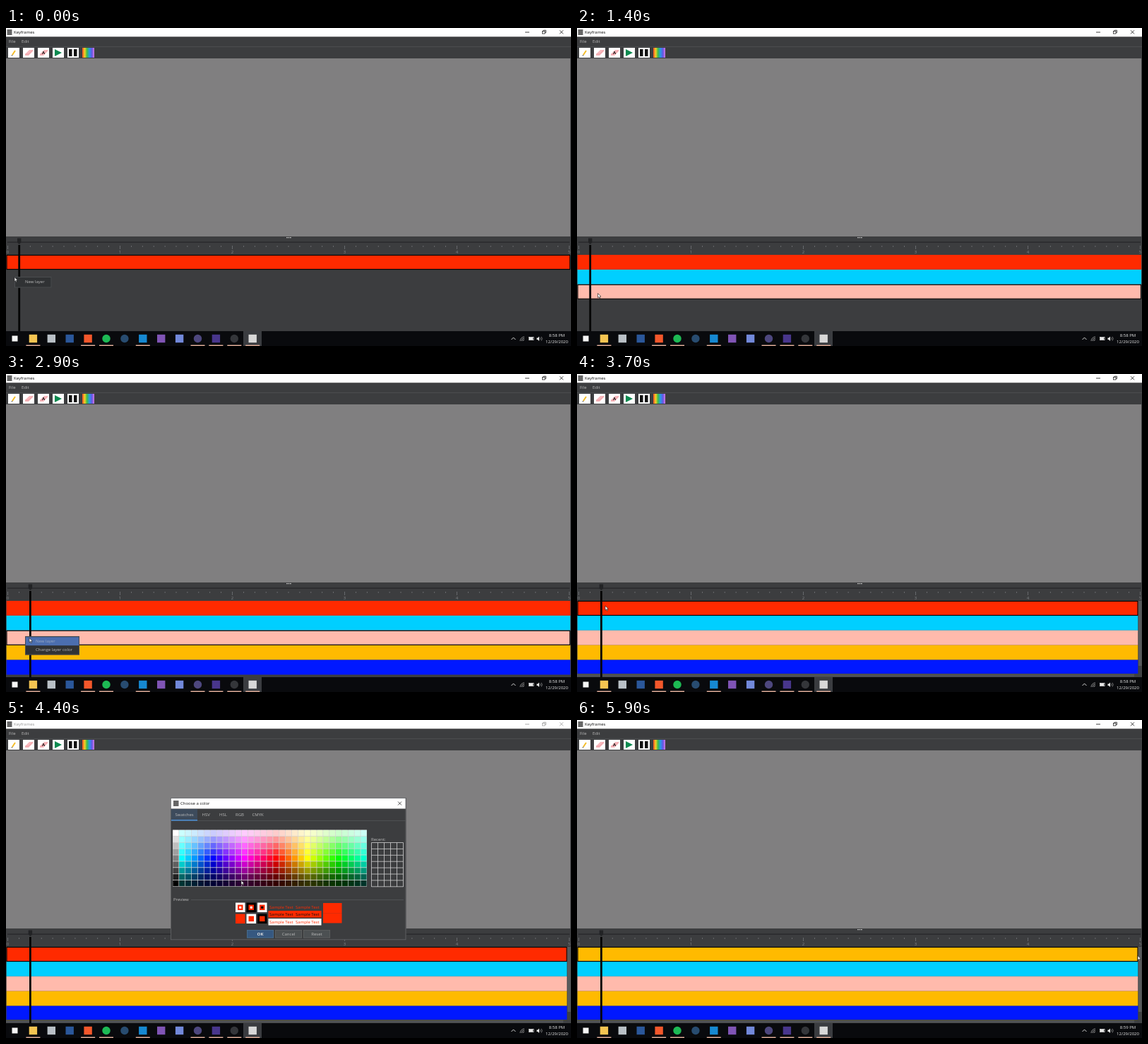
An HTML page with a canvas that plays this animation: 800 by 450 pixels, repeating every 6.1 s.

```html
<!DOCTYPE html>
<html lang="en">
<head>
<meta charset="utf-8">
<title>Keyframes</title>
<style>
  html, body { margin: 0; height: 100%; overflow: hidden; background: #3c3d3f; }
  canvas { display: block; }
</style>
</head>
<body>
<canvas id="stage" width="800" height="450"></canvas>
<script>
const ctx = document.getElementById('stage').getContext('2d');
const LOOP = 6100, STEP = 100;
const RED = '#ff2a00', AMBER = '#ffba00', PANEL = '#3c3d3f', TEXT = '#bbbbbb';
const LAYERS = [
  { at: 0, color: RED }, { at: 500, color: '#00cfff' }, { at: 1100, color: '#ffbaac' },
  { at: 2000, color: AMBER }, { at: 2500, color: '#0018ff' }
];
const SCROLLBARS_AT = 3000, RECOLOR_AT = 5200;
const DIALOG = { open: 4200, pick: 4700, close: RECOLOR_AT };
const MENUS = [
  { from: 0, to: 500, x: 12, y: 352, items: ['New layer'] },
  { from: 700, to: 1100, x: 20, y: 372, items: ['New layer'] },
  { from: 1700, to: 2000, x: 27, y: 371, items: ['New layer', 'Change layer color'] },
  { from: 2200, to: 2500, x: 27, y: 371, items: ['New layer', 'Change layer color'] },
  { from: 2700, to: 3000, x: 27, y: 371, items: ['New layer', 'Change layer color'] },
  { from: 3900, to: 4200, x: 40, y: 328, items: ['New layer', 'Change layer color'] }
];
// time, x, y
const POINTER = [
  [0, 12, 352.5], [300, 25, 359], [500, 25, 359], [700, 20, 372], [1000, 32, 379],
  [1400, 29.5, 375.5], [1700, 27, 371], [1900, 33, 375], [2200, 27, 371], [2400, 33, 375],
  [2700, 27, 371], [2900, 33, 373.5], [3100, 33, 374], [3500, 40, 328], [3900, 40, 328],
  [4100, 54, 345], [4400, 333, 227], [4600, 417, 195], [4700, 417, 195], [4900, 360, 302],
  [5000, 355.5, 304.5], [5200, 355.5, 304.5], [5600, 620, 334], [5900, 794, 333.5]
];

function rect(x, y, w, h, fill) {
  ctx.fillStyle = fill;
  ctx.fillRect(x, y, w, h);
}
function frame(x, y, w, h, color, width = 1) {
  ctx.strokeStyle = color;
  ctx.lineWidth = width;
  ctx.strokeRect(x, y, w, h);
}
function line(color, width, ...p) {
  ctx.strokeStyle = color;
  ctx.lineWidth = width;
  ctx.beginPath();
  for (let i = 0; i < p.length; i += 2) ctx.lineTo(p[i], p[i + 1]);
  ctx.stroke();
}
function poly(fill, ...p) {
  ctx.fillStyle = fill;
  ctx.beginPath();
  for (let i = 0; i < p.length; i += 2) ctx.lineTo(p[i], p[i + 1]);
  ctx.closePath();
  ctx.fill();
}
function disc(x, y, r, fill) {
  ctx.fillStyle = fill;
  ctx.beginPath();
  ctx.arc(x, y, r, 0, 7);
  ctx.fill();
}
function text(s, x, y, color = TEXT, align = 'left', weight = '') {
  ctx.font = `${weight} 6px "Open Sans", sans-serif`;
  ctx.textAlign = align;
  ctx.textBaseline = 'middle';
  ctx.fillStyle = color;
  ctx.fillText(s, x, y);
}

function pointerAt(t) {
  const i = POINTER.findIndex(p => p[0] > t);
  if (i < 0) return POINTER.at(-1).slice(1);
  const [t0, x0, y0] = POINTER[i - 1], [t1, x1, y1] = POINTER[i];
  const k = (t - t0) / (t1 - t0);
  return [x0 + (x1 - x0) * k, y0 + (y1 - y0) * k];
}

function drawWindow(inactive) {
  const ink = inactive ? '#999' : '#111';
  rect(0, 0, 800, 12.5, '#fff');
  rect(1.5, 2, 7, 8, '#666');
  text('Keyframes', 11, 6.5, ink);
  line(ink, .8, 735, 6, 741, 6);
  frame(759.5, 4.5, 3.5, 3.5, ink, .7);
  line(ink, .7, 761, 4.5, 761, 3.2, 764.5, 3.2, 764.5, 6.7, 763, 6.7);
  line(ink, .8, 784, 3.3, 789, 8.3);
  line(ink, .8, 789, 3.3, 784, 8.3);
  rect(0, 12.5, 800, 30.5, PANEL);
  rect(0, 26, 800, 1, '#4b4d4f');
  text('File', 4, 19.5);
  text('Edit', 22, 19.5);
  drawTools();
  rect(0, 43, 799, 252, '#807f80');
}

function drawTools() {
  for (let i = 0; i < 5; i++) rect(3 + 21 * i, 28, 16, 14, '#fff');
  line('#f5bd28', 2, 9, 38, 13, 32);
  line('#333', 1, 8, 39.5, 9, 38);
  for (const x of [26, 47]) {
    poly('#f7b9bd', x + 1, 37, x + 7, 31, x + 12, 31, x + 12, 33, x + 6, 39, x + 1, 39);
    line('#e58e98', .6, x + 1, 37, x + 6, 37, x + 12, 31);
  }
  text('A', 53, 35.5, '#111', 'center', 'bold');
  poly('#0d8a50', 69, 30, 79, 35, 69, 40);
  rect(89, 30, 4.5, 10, '#111');
  rect(96, 30, 4.5, 10, '#111');
  const rainbow = ctx.createLinearGradient(108, 0, 125, 0);
  ['#f04a28', '#f5cf25', '#38bd4c', '#2b98e8', '#6558e5', '#d579e4']
    .forEach((c, i) => rainbow.addColorStop(i / 5, c));
  rect(108, 28, 17, 14, rainbow);
}

function drawTimeline(t) {
  const scroll = t >= SCROLLBARS_AT;
  const head = t < 1500 ? 18.7 : 34.4;
  const selected = t < 1400 ? 0 : t < 3600 ? 2 : 0;
  rect(0, 295, 800, 134, PANEL);
  for (let i = 0; i < 3; i++) rect(397 + 2.5 * i, 296, 1.8, 1.2, '#c8c8c8');
  rect(2, 302.5, 796, 1.2, '#252628');
  for (let i = 0; i <= 50; i++) {
    const x = 2.5 + i * 15.9;
    rect(x - .4, 308, .8, i % 10 ? 2 : 5, '#737578');
    if (i % 10 === 0) text(i / 10, x, 317, '#858789', 'center');
  }
  const right = scroll ? 794.5 : 799, bottom = scroll ? 424 : 426;
  LAYERS.forEach(({ at, color }, i) => {
    if (t < at) return;
    const y = 321 + i * 20.9;
    const fill = i === 0 && t >= RECOLOR_AT ? AMBER : color;
    rect(.7, y, right - .7, Math.min(20.9, bottom - y), fill);
  });
  frame(1, 321.5 + selected * 20.9, right - 1.5, 20, '#050505', 1.2);
  if (scroll) {
    rect(794.5, 321, 5.5, 108, '#3f4143');
    rect(795, 321, 4.5, 92, '#585a5c');
    rect(0, 424, 794.5, 5, '#3f4143');
    rect(0, 424.5, 789, 4, '#505254');
  }
  poly('#222325', head - 2.7, 297.5, head + 2.7, 297.5, head + 2.7, 303.5, head, 306, head - 2.7, 303.5);
  rect(head - 1.4, 307, 2.8, 122, '#050505');
}

function drawMenu({ x, y, items }, px, py) {
  const w = items.length > 1 ? 77 : 52.5, h = 2.5 + items.length * 12 + (items.length > 1 ? 0 : 1);
  rect(x, y, w, h, '#303234');
  frame(x + .5, y + .5, w - 1, h - 1, '#515456', .8);
  items.forEach((label, i) => {
    const top = y + 1.2 + i * 12;
    const hover = px > x + 1 && px < x + w && py > top && py < top + 12;
    if (hover) rect(x + 1, top, w - 2, 12, '#4b6eaf');
    text(label, x + 15, top + 6.6, hover ? '#9aa9c2' : TEXT);
  });
}

function drawSwatches(picked) {
  const cw = 8.87, ch = 8.9;
  rect(236, 155.5, 31 * cw, 9 * ch, '#d5d5d5');
  for (let c = 0; c < 31; c++) {
    for (let r = 0; r < 9; r++) {
      const fill = c ? `hsl(${168 + 12 * c} 100% ${90 - 10 * r}%)` : `hsl(0 0% ${100 - 12.5 * r}%)`;
      rect(236.3 + c * cw, 155.8 + r * ch, cw - .7, ch - .8, fill);
    }
  }
  if (picked) {
    frame(413.6, 191.5, 7.8, 7.8, '#4d4100', .9);
    line('#4d4100', .8, 413.6, 199.3, 421.4, 191.5);
  }
  text('Recent:', 517, 169);
  if (picked) rect(518, 174, 8, 8, AMBER);
  for (let c = 0; c <= 5; c++) line('#d0d0d0', .8, 517.5 + c * 9, 173.5, 517.5 + c * 9, 236);
  for (let r = 0; r <= 7; r++) line('#d0d0d0', .8, 517.5, 173.5 + r * 8.9, 562.5, 173.5 + r * 8.9);
}

function drawPreview(color) {
  text('Preview', 237, 254);
  rect(262, 254, 301, .8, '#55585a');
  const nested = (x, y, ...fills) => fills.forEach((f, i) => {
    const inset = [0, 3, 5.2][i];
    rect(x + inset, y + inset, 13.5 - 2 * inset, 13.5 - 2 * inset, f);
  });
  nested(325, 258.5, '#fff', color, '#fff');
  nested(340.5, 258.5, '#000', color, '#fff');
  nested(356, 258.5, '#fff', color, '#000');
  nested(325, 274.5, color);
  nested(340.5, 274.5, '#fff', color);
  nested(356, 274.5, '#000', color);
  rect(371.5, 270, 75, 9.5, color);
  rect(371.5, 281, 75, 9.5, '#fff');
  [color, '#111', color].forEach((ink, i) => {
    for (const x of [373, 410]) text('Sample Text', x, 265 + i * 10.8, ink);
  });
  rect(449, 259, 26.5, 14.2, RED);
  rect(449, 273.2, 26.5, 14.2, color);
}

function drawDialog(t) {
  const picked = t >= DIALOG.pick;
  rect(233, 110, 333.5, 201, PANEL);
  rect(233, 110.5, 333, 15, '#fff');
  frame(233.4, 110.4, 332.6, 200.4, '#64676a', .8);
  rect(237, 114, 7.5, 8, '#666');
  text('Choose a color', 247, 118.5, '#111');
  line('#222', .8, 555, 115.5, 560, 120.5);
  line('#222', .8, 560, 115.5, 555, 120.5);
  if (!picked) rect(234, 126, 37, 16, '#3d4b5c');
  rect(234, 142, 332, .7, '#55585a');
  rect(234, 141, 37, 1.7, '#4a88c7');
  [['Swatches', 239.5], ['HSV', 277.5], ['HSL', 302], ['RGB', 325], ['CMYK', 348.5]]
    .forEach(([s, x]) => text(s, x, 134.3));
  drawSwatches(picked);
  drawPreview(picked ? AMBER : RED);
  ['OK', 'Cancel', 'Reset'].forEach((label, i) => {
    const x = 341 + 40 * i;
    rect(x, 297, 38, 11.5, i ? '#4c5052' : '#365880');
    frame(x + .4, 297.4, 37.2, 10.7, i ? '#5e6060' : '#4c708c', .8);
    text(label, x + 19, 303, i ? TEXT : '#e0e0e0', 'center', i ? '' : 'bold');
  });
}

function drawTaskbar(t) {
  rect(0, 429, 800, 21, '#090a0d');
  rect(336, 429, 26, 21, '#3a3c40');
  const colors = ['#f5f5f5', '#f4c451', '#b9c0c6', '#2b579a', '#f4572b', '#1db954', '#284c70',
    '#1688d1', '#8054b5', '#7289da', '#4d477e', '#48368c', '#34363a', '#d8d8d8'];
  const round = [5, 6, 10, 12], running = [1, 4, 5, 7, 10, 11, 12, 13];
  colors.forEach((c, i) => {
    const x = 12.5 + i * 25.9;
    const r = i ? 5.7 : 4;
    if (round.includes(i)) disc(x, 439.5, r, c);
    else rect(x - r, 439.5 - r, 2 * r, 2 * r, c);
    if (running.includes(i)) rect(x - 10, 448.5, 20, 1.5, '#dba995');
  });
  const ink = '#e8e8e8';
  line(ink, .9, 715.5, 441, 718.5, 438, 721.5, 441);
  for (const r of [2, 4, 6]) {
    ctx.beginPath();
    ctx.arc(734, 443, r, Math.PI, Math.PI * 1.5);
    ctx.strokeStyle = '#aaa';
    ctx.lineWidth = .8;
    ctx.stroke();
  }
  frame(740.5, 437.5, 6.5, 4, ink, .8);
  rect(741, 438, 5, 3, ink);
  poly(ink, 751.5, 438.5, 753, 438.5, 755, 436.5, 755, 443, 753, 441, 751.5, 441);
  for (const r of [2, 4]) {
    ctx.beginPath();
    ctx.arc(755, 439.7, r, -.8, .8);
    ctx.strokeStyle = '#aaa';
    ctx.lineWidth = .7;
    ctx.stroke();
  }
  text(t < 4700 ? '8:58 PM' : '8:59 PM', 780, 435, ink, 'center');
  text('12/29/2020', 780, 444.5, ink, 'center');
}

function drawPointer(x, y) {
  const p = [0, 0, 0, 6.2, 1.4, 5, 2.4, 7.2, 3.4, 6.8, 2.5, 4.6, 4.4, 4.5]
    .map((v, i) => v + (i % 2 ? y : x));
  poly('#fff', ...p);
  line('#111', .6, ...p, x, y);
}

function draw(t) {
  const dialog = t >= DIALOG.open && t < DIALOG.close;
  const [px, py] = pointerAt(t);
  drawWindow(dialog);
  drawTimeline(t);
  MENUS.filter(m => t >= m.from && t < m.to).forEach(m => drawMenu(m, px, py));
  if (dialog) drawDialog(t);
  drawTaskbar(t);
  drawPointer(px, py);
}

const start = performance.now();
function tick() {
  const t = (performance.now() - start) % LOOP;
  draw(Math.min(Math.floor(t / STEP) * STEP, 5900));
  requestAnimationFrame(tick);
}
tick();
</script>
</body>
</html>
```
